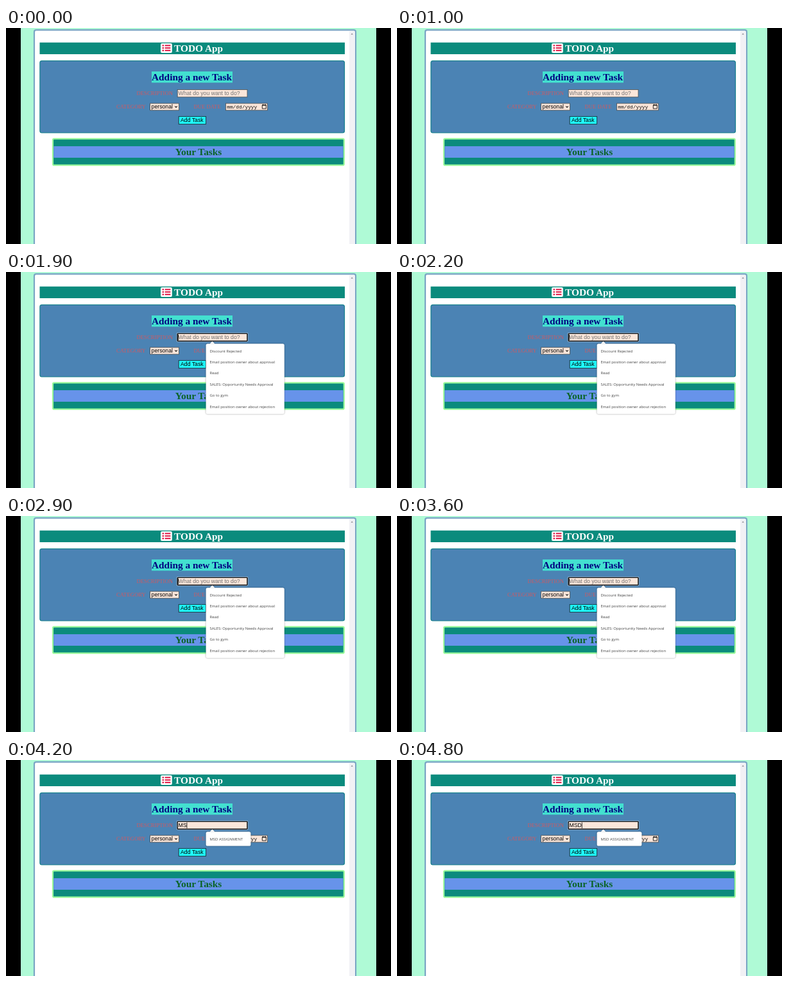
These frames come from a looping animation (600 px wide and 338 px high, 5000 ms). An HTML page:

```html
<!DOCTYPE html>
<html lang="en">
<head>
<meta charset="utf-8">
<title>TODO App</title>
<style>
  html, body { margin: 0; width: 100%; height: 100%; overflow: hidden; background: #000; }
  svg { display: block; width: 100vw; height: 100vh; }
  .serif { font: 8.7px "Liberation Serif", "Times New Roman", serif; fill: #cf5a62; }
  .head { font: bold 15.35px "Liberation Serif", "Times New Roman", serif; }
  .ui { font: 8.7px "Liberation Sans", Arial, sans-serif; }
  .mono { font: 7.85px "Liberation Mono", monospace; }
  .menu { font: 5.95px "Open Sans", "Noto Sans", sans-serif; fill: #444; }
  .field { fill: #fae6da; stroke: #4d4d4d; stroke-width: .8; }
  .popup { filter: drop-shadow(0 .5px 1px rgba(0, 0, 0, .4)); }
</style>
</head>
<body>
<svg viewBox="0 0 600 338" preserveAspectRatio="none">
  <!-- page -->
  <rect width="600" height="338" fill="#000"/>
  <rect x="23" width="554" height="338" fill="#affad6"/>
  <rect x="44" y="3.2" width="501" height="345" rx="3" fill="#fff" stroke="#79a5c4" stroke-width="2.2"/>
  <rect x="535" y="5" width="8.6" height="333" fill="#f1f1f5"/>
  <path d="M537.4 10.2L539.2 8.2L541 10.2Z" fill="#8a8a90"/>

  <!-- title -->
  <rect x="52.5" y="22.7" width="475.5" height="18.3" fill="#0b8b7d"/>
  <rect x="241" y="24" width="17.8" height="15" rx="2" fill="#fff"/>
  <g id="list" fill="#e01543"></g>
  <text class="head" x="262" y="37" fill="#fff">TODO App</text>

  <!-- form -->
  <rect x="52.9" y="51.4" width="474.6" height="112.6" rx="3" fill="#4b83b4" stroke="#14808c" stroke-width="1.2"/>
  <rect x="227" y="68" width="126" height="17.6" fill="#43e0d0"/>
  <text class="head" x="227" y="82" fill="#000080">Adding a new Task</text>

  <text class="serif" x="203.5" y="105">DESCRIPTION</text>
  <text class="serif" x="172" y="126">CATEGORY</text>
  <text class="serif" x="292.5" y="126">DUE DATE</text>

  <rect class="field" x="267.2" y="96.4" width="108.8" height="11.6"/>
  <g id="focus" fill="none">
    <rect x="266.2" y="95.4" width="110.8" height="13.6" rx="1" stroke="#d8e2ea" stroke-width=".6"/>
    <rect x="267.2" y="96.3" width="108.8" height="11.8" rx=".8" stroke="#101010" stroke-width="1.3"/>
  </g>
  <text id="typed" class="ui" x="268.5" y="105.2"></text>
  <rect id="caret" y="97.6" width=".8" height="9.2" fill="#000"/>

  <rect class="field" x="224.6" y="118" width="44.8" height="10.8"/>
  <text class="ui" x="226.6" y="126">personal</text>
  <path d="M263.2 122.4L265 124.3L266.8 122.4" fill="none" stroke="#111" stroke-width="1.1"/>

  <rect class="field" x="342.4" y="118" width="65" height="10.8"/>
  <text class="mono" x="344.2" y="126" fill="#111">mm/dd/yyyy</text>
  <path d="M399.3 121h6v5.2h-6ZM399 120.5h6.6M400.6 119v1.4M404 119v1.4" fill="none" stroke="#111" stroke-width=".9"/>

  <rect x="269.2" y="138.4" width="42.4" height="12" fill="#1ff8fb" stroke="#16333b" stroke-width=".9"/>
  <text class="ui" x="272" y="147.2">Add Task</text>

  <!-- tasks -->
  <rect x="73" y="173.3" width="453.8" height="41.4" rx="2" fill="#0b8b7d" stroke="#9afb9b" stroke-width="2.2"/>
  <rect x="74.3" y="185" width="451.2" height="18" fill="#6793ea"/>
  <text class="head" x="263.7" y="199.3" fill="#0a6427">Your Tasks</text>

  <g id="history" class="popup"></g>
  <g id="match" class="popup"></g>
</svg>
<script>
const LOOP = 5000;
const $ = id => document.getElementById(id);

// Each step holds until the next one.
const steps = [
  { at: 0,    text: "",    focus: false, caret: false, menu: "" },
  { at: 1900, text: "",    focus: true,  caret: true,  menu: "history" },
  { at: 2400, text: "",    focus: true,  caret: false, menu: "history" },
  { at: 2900, text: "",    focus: true,  caret: true,  menu: "history" },
  { at: 3700, text: "M",   focus: true,  caret: true,  menu: "match" },
  { at: 4200, text: "MS",  focus: true,  caret: true,  menu: "match" },
  { at: 4800, text: "MSD", focus: true,  caret: true,  menu: "match" }
];

function buildMenu(id, width, height, items) {
  const rows = items.map((item, i) =>
    `<text class="menu" x="317.5" y="${125.6 + i * 17.42}">${item}</text>`).join("");
  $(id).innerHTML =
    `<rect x="311.6" y="112.2" width="${width}" height="${height}" rx="2.6" fill="#fff"/>` +
    `<path d="M317.4 112.6L321.5 108.4L325.6 112.6Z" fill="#fff"/>` + rows;
}

buildMenu("history", 122.2, 110, [
  "Discount Rejected",
  "Email position owner about approval",
  "Read",
  "SALES: Opportunity Needs Approval",
  "Go to gym",
  "Email position owner about rejection"
]);
buildMenu("match", 69.8, 22.4, ["MSD ASSIGNMENT"]);

$("list").innerHTML = [27.4, 31.3, 35.2].map(y =>
  `<rect x="243.6" y="${y - 1.1}" width="2.4" height="2.2"/>` +
  `<rect x="247.6" y="${y - 1}" width="8.8" height="2"/>`).join("");

const show = (id, on) => $(id).setAttribute("visibility", on ? "visible" : "hidden");
let current;

function apply(step) {
  const typed = $("typed");
  typed.textContent = step.text || "What do you want to do?";
  typed.setAttribute("fill", step.text ? "#000" : "#757575");
  const end = step.text ? typed.getComputedTextLength() : -0.4;
  $("caret").setAttribute("x", 268.5 + end);
  show("focus", step.focus);
  show("caret", step.caret);
  show("history", step.menu === "history");
  show("match", step.menu === "match");
}

function draw() {
  const t = performance.now() % LOOP;
  const step = steps.filter(s => s.at <= t).pop();
  if (step !== current) apply(current = step);
  requestAnimationFrame(draw);
}
draw();
</script>
</body>
</html>
```
